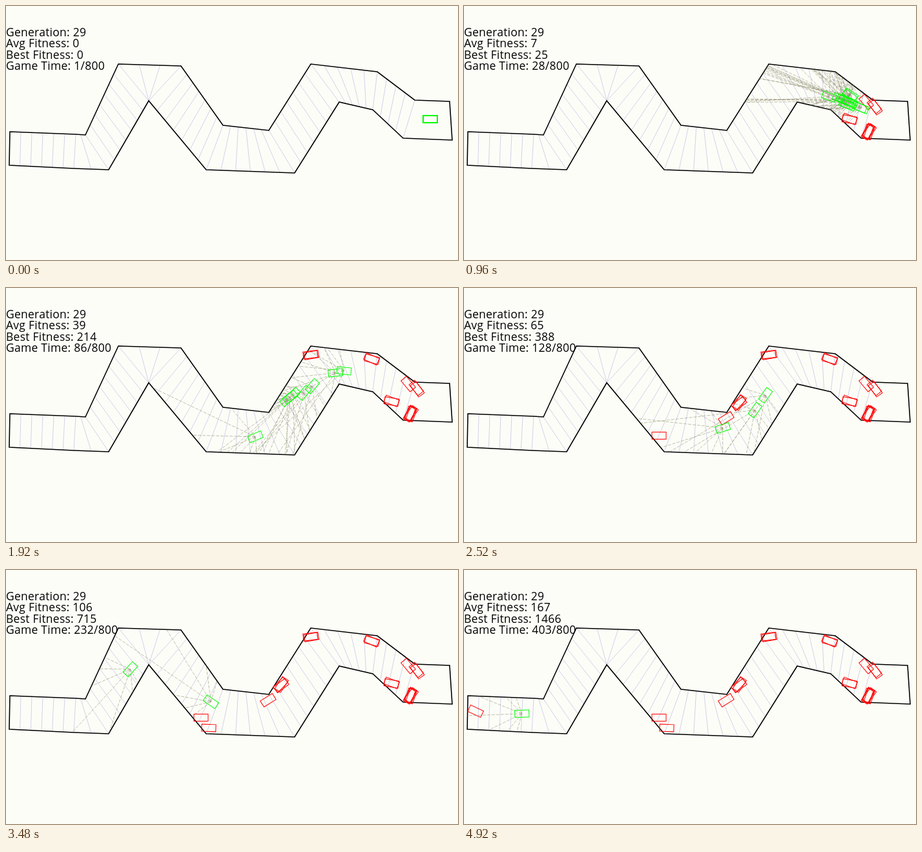
These frames come from a looping animation (700 px wide and 394 px high, 5040 ms). An HTML page with a canvas:

```html
<!DOCTYPE html>
<html lang="en">
<head>
<meta charset="utf-8">
<title>Evolving cars</title>
<style>
html, body { margin: 0; width: 100%; height: 100%; overflow: hidden; background: #fdfdf8; }
canvas { display: block; }
</style>
</head>
<body>
<canvas id="stage" width="700" height="394"></canvas>
<script>
const ctx = document.getElementById('stage').getContext('2d');
const STEP = 120, STEPS = 42, GATE_GAP = 17, RAY_GAP = 0.42;

// Matching corners of the upper and lower wall: [x, y, x, y]
const corners = [
  [6, 195, 5, 247], [108, 199, 105, 252], [123, 200, 159, 254], [174, 90, 221, 147],
  [271, 93, 221, 147], [336, 185, 310, 254], [407, 193, 447, 259], [472, 90, 516, 149],
  [575, 102, 568, 161], [633, 146, 615, 205], [687, 148, 691, 208]
];

// Rough middle line of the road, from the start to the far end
const middle = [
  [657, 175.5], [600, 150], [545, 126], [490, 122], [430, 215],
  [330, 222], [235, 112], [190, 150], [140, 222], [18, 219]
];

// Where cars end up: [x, y, tilt in degrees, tick, cars]
const sites = [
  [623, 149, 50, 22, 1], [637, 157, 54, 24, 2], [597, 176, 10, 26, 2], [626, 194, -62, 22, 5],
  [566, 110, 24, 44, 2], [473, 104, -10, 76, 2], [425, 178, -46, 92, 3], [406, 202, -32, 116, 1],
  [302, 229, 0, 108, 1], [314, 245, 2, 200, 1], [18, 219, 25, 315, 1], [88, 223, 0, 404, 1]
];

// [step, tick, average fitness, best fitness]
const progress = [
  [0, 1, 0, 0], [8, 28, 7, 25], [12, 52, 18, 74], [21, 128, 65, 388],
  [29, 232, 106, 715], [36, 330, 150, 1466], [41, 403, 167, 1466]
];

const mix = (a, b, u) => a + (b - a) * u;
const mixAll = (a, b, u) => a.map((v, i) => mix(v, b[i], u));
const gap = (a, b) => Math.hypot(b[0] - a[0], b[1] - a[1]);

let seed = 29;
function jitter(size) {
  seed = seed * 16807 % 2147483647;
  return (seed / 2147483647 * 2 - 1) * size;
}

// Row of a table at a value of its first column
function lookup(rows, value) {
  let i = 0;
  while (i < rows.length - 2 && value >= rows[i + 1][0]) i++;
  const a = rows[i], b = rows[i + 1];
  return mixAll(a, b, Math.min(1, (value - a[0]) / (b[0] - a[0])));
}

// Cut the corners of an open line
function smooth(line) {
  const out = [line[0]];
  for (let i = 1; i < line.length; i++) {
    out.push(mixAll(line[i - 1], line[i], 0.25), mixAll(line[i - 1], line[i], 0.75));
  }
  return [...out, line[line.length - 1]];
}

const track = [
  ...corners.map(c => c.slice(0, 2)),
  ...corners.map(c => c.slice(2)).reverse()
];

// Rows of [distance, x, y]
let travelled = 0;
const lane = smooth(smooth(smooth(middle))).map((p, i, all) => {
  travelled += i ? gap(all[i - 1], p) : 0;
  return [travelled, ...p];
});

function makeCar([x, y, tilt, tick], k) {
  const spread = k ? 1 : 0;
  const end = [x + jitter(2) * spread, y + jitter(2) * spread];
  const near = lane.reduce((a, b) => gap(a.slice(1), end) < gap(b.slice(1), end) ? a : b);
  return {
    tick: tick + jitter(3) * spread,
    angle: (tilt + jitter(12) * spread) * Math.PI / 180,
    distance: near[0],
    drift: [end[0] - near[1], end[1] - near[2]],
    sway: [jitter(5), jitter(8)]
  };
}

const cars = sites.flatMap(site =>
  Array.from({ length: site[4] }, (_, k) => makeCar(site, k)));

function place(car, tick) {
  const u = Math.min(1, (tick - 1) / (car.tick - 1));
  const [, x, y] = lookup(lane, car.distance * u);
  const swing = Math.sin(Math.PI * u);
  return [
    x + car.drift[0] * u ** 3 + car.sway[0] * swing,
    y + car.drift[1] * u ** 3 + car.sway[1] * swing
  ];
}

function pose(car, tick) {
  const [x, y] = place(car, tick), dead = tick >= car.tick;
  if (dead) return { x, y, dead, angle: car.angle };
  if (tick <= 1) return { x, y, dead, angle: Math.PI };
  const [px, py] = place(car, Math.max(1, tick - 4));
  return { x, y, dead, angle: Math.atan2(y - py, x - px) };
}

// Distance from a point to the nearest wall in a direction
function reach(x, y, dx, dy) {
  let best = Infinity;
  track.forEach(([ax, ay], i) => {
    const [bx, by] = track[(i + 1) % track.length];
    const ex = bx - ax, ey = by - ay, det = dx * ey - dy * ex;
    if (!det) return;
    const d = ((ax - x) * ey - (ay - y) * ex) / det;
    const u = ((ax - x) * dy - (ay - y) * dx) / det;
    if (d > 0 && u >= 0 && u <= 1) best = Math.min(best, d);
  });
  return best === Infinity ? 0 : best;
}

function line(x1, y1, x2, y2) {
  ctx.moveTo(x1, y1);
  ctx.lineTo(x2, y2);
}

function drawTrack() {
  ctx.lineWidth = 1;
  ctx.strokeStyle = '#d2d2e8';
  ctx.beginPath();
  for (let i = 0; i < corners.length - 2; i++) {
    const a = corners[i], b = corners[i + 1];
    const length = (gap(a, b) + gap(a.slice(2), b.slice(2))) / 2;
    const n = Math.round(length / GATE_GAP);
    for (let k = 1; k <= n; k++) line(...mixAll(a, b, k / n));
  }
  ctx.stroke();
  ctx.lineWidth = 1.6;
  ctx.strokeStyle = '#000';
  ctx.beginPath();
  track.forEach(([x, y]) => ctx.lineTo(x, y));
  ctx.closePath();
  ctx.stroke();
}

function drawRays({ x, y, angle }) {
  ctx.lineWidth = 1;
  ctx.strokeStyle = 'rgba(130,130,95,0.5)';
  ctx.setLineDash([5, 2]);
  ctx.beginPath();
  for (let k = -3; k <= 3; k++) {
    const dx = Math.cos(angle + k * RAY_GAP), dy = Math.sin(angle + k * RAY_GAP);
    const d = reach(x, y, dx, dy);
    line(x, y, x + dx * d, y + dy * d);
  }
  ctx.stroke();
  ctx.setLineDash([]);
}

function drawCar({ x, y, angle, dead }) {
  ctx.save();
  ctx.translate(x, y);
  ctx.rotate(angle);
  ctx.lineWidth = 1;
  ctx.strokeStyle = dead ? '#f00' : '#0f0';
  ctx.strokeRect(-11, -5.5, 22, 11);
  ctx.restore();
}

function drawText(tick, average, best) {
  const rows = [
    'Generation: 29',
    'Avg Fitness: ' + average,
    'Best Fitness: ' + best,
    'Game Time: ' + tick + '/800'
  ];
  ctx.font = '500 17.5px "Open Sans", sans-serif';
  ctx.letterSpacing = '0.25px';
  ctx.fillStyle = '#000';
  rows.forEach((row, i) => ctx.fillText(row, 0, 47 + i * 17.4));
}

function draw(step) {
  const [, tick, average, best] = lookup(progress, step).map(Math.round);
  const poses = cars.map(c => pose(c, tick));
  ctx.fillStyle = '#fdfdf8';
  ctx.fillRect(0, 0, 700, 394);
  drawTrack();
  if (tick > 1) poses.filter(p => !p.dead).forEach(drawRays);
  poses.forEach(drawCar);
  drawText(tick, average, best);
}

const begin = performance.now();
function loop() {
  draw(Math.floor((performance.now() - begin) / STEP) % STEPS);
  requestAnimationFrame(loop);
}
loop();
</script>
</body>
</html>
```
